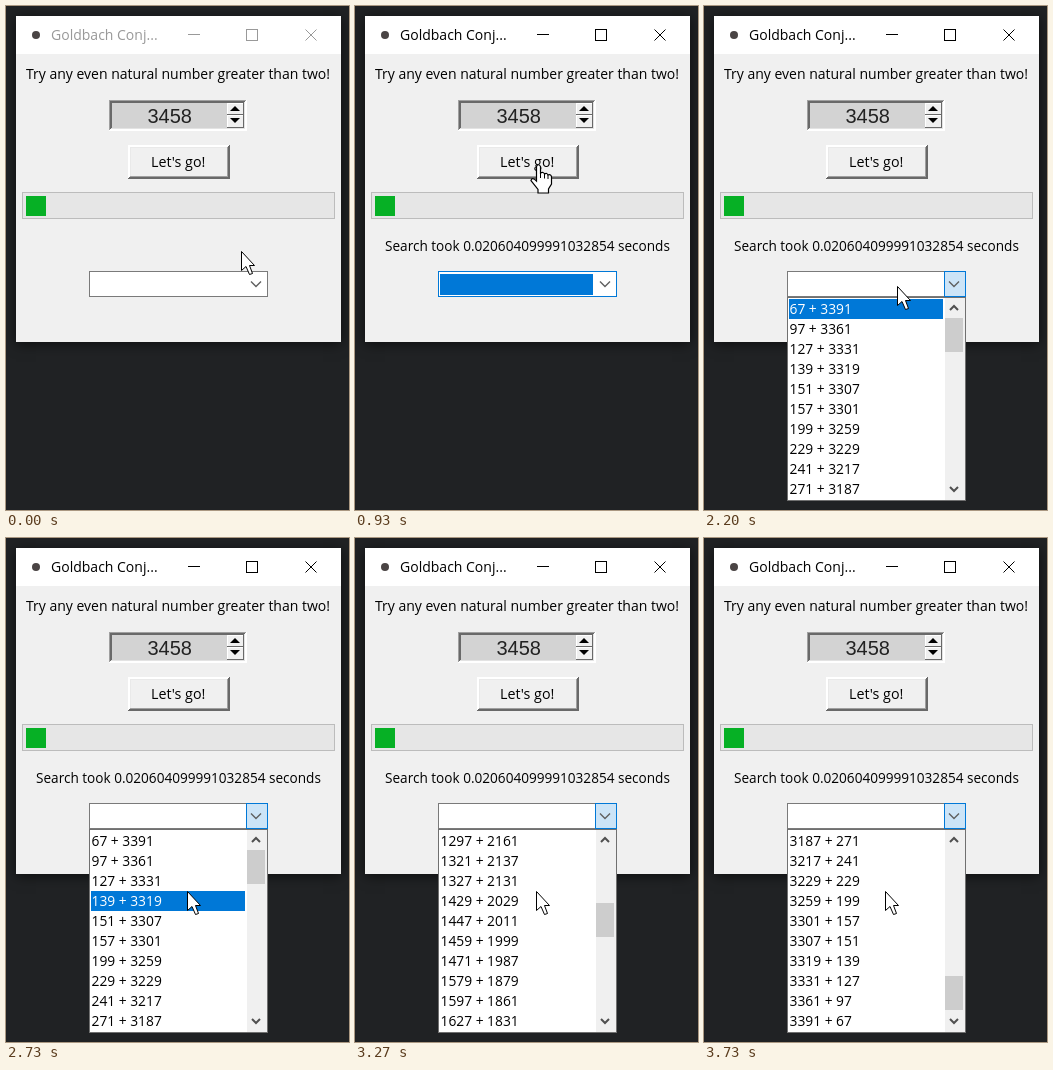
These frames come from a looping animation (343 by 504 pixels, 5000 ms). An HTML page with a canvas:

```html
<!DOCTYPE html>
<html lang="en">
<head>
<meta charset="utf-8">
<title>Goldbach Conjecture</title>
<style>
  html, body { margin: 0; width: 100%; height: 100%; overflow: hidden; background: #202224; }
  canvas { display: block; }
</style>
</head>
<body>
<canvas id="stage" width="343" height="504"></canvas>
<script>
const ctx = document.getElementById('stage').getContext('2d');
const LOOP = 5000, TICK = 1000 / 15;
const SUM = 3458, ROWS = 10, ROW_H = 20, LIST_TOP = 293, NOTCH = 4;
const BLUE = '#0078d7', FACE = '#f0f0f0', UI = '"Open Sans", "Noto Sans", sans-serif';

const isPrime = n => {
  if (n < 2) return false;
  for (let d = 2; d * d <= n; d++) if (n % d === 0) return false;
  return true;
};
const pairs = [];
for (let p = 2; p < SUM; p++) {
  if (isPrime(p) && isPrime(SUM - p)) pairs.push(`${p} + ${SUM - p}`);
}
const MAX_FIRST = pairs.length - ROWS;

function rect(x, y, w, h, fill) {
  ctx.fillStyle = fill;
  ctx.fillRect(x, y, w, h);
}

function frame(x, y, w, h, color, fill) {
  rect(x, y, w, h, color);
  rect(x + 1, y + 1, w - 2, h - 2, fill);
}

// Concentric one-pixel edges, each given as [top-left, bottom-right].
function bevel(x, y, w, h, edges, fill) {
  edges.forEach(([light, dark], i) => {
    const a = w - 2 * i, b = h - 2 * i;
    rect(x + i, y + i, a, b, dark);
    rect(x + i, y + i, a - 1, 1, light);
    rect(x + i, y + i, 1, b - 1, light);
  });
  const n = edges.length;
  rect(x + n, y + n, w - 2 * n, h - 2 * n, fill);
}

function text(str, x, y, size, color = '#000', family = UI) {
  ctx.font = `${size}px ${family}`;
  ctx.fillStyle = color;
  ctx.fillText(str, x, y);
}

function line(points, color, width = 1) {
  ctx.beginPath();
  points.forEach(([x, y]) => ctx.lineTo(x, y));
  ctx.strokeStyle = color;
  ctx.lineWidth = width;
  ctx.stroke();
}

function polygon(points, fill) {
  ctx.beginPath();
  points.forEach(([x, y]) => ctx.lineTo(x, y));
  ctx.closePath();
  ctx.fillStyle = fill;
  ctx.fill();
}

function chevron(x, y, r, dir, color, width) {
  line([[x - r, y - dir * r / 2], [x, y + dir * r / 2], [x + r, y - dir * r / 2]], color, width);
}

function drawWindow(active) {
  rect(0, 0, 343, 504, '#202224');
  ctx.save();
  ctx.shadowColor = 'rgba(0,0,0,0.6)';
  ctx.shadowBlur = 12;
  ctx.shadowOffsetY = 2;
  rect(10, 10, 325, 326, FACE);
  ctx.restore();
  rect(10, 10, 325, 38, '#fff');

  const ink = active ? '#000' : '#999';
  ctx.beginPath();
  ctx.arc(30, 29, 4, 0, 7);
  ctx.fillStyle = '#4a4444';
  ctx.fill();
  text('Goldbach Conj...', 45, 34, 14, ink);
  rect(182, 28, 12, 1, ink);
  ctx.strokeStyle = ink;
  ctx.lineWidth = 1;
  ctx.strokeRect(240.5, 23.5, 11, 11);
  line([[299.5, 23.5], [310.5, 34.5]], ink);
  line([[310.5, 23.5], [299.5, 34.5]], ink);
}

function drawSpinbox() {
  bevel(103, 94, 138, 31, [['#a0a0a0', '#fff'], ['#696969', '#fff'], ['#696969', '#e3e3e3']], '#d3d3d3');
  text('3458', 141.5, 117, 20, '#222', '"Liberation Sans", Arial, sans-serif');
  const raised = [['#fff', '#696969']];
  bevel(221, 97, 17, 12, raised, FACE);
  bevel(221, 109, 17, 13, raised, FACE);
  polygon([[224, 105], [234, 105], [229, 100]], '#000');
  polygon([[224, 112], [234, 112], [229, 117]], '#000');
}

const RELIEF = {
  raised: [['#fff', '#696969'], ['#fff', '#696969'], ['#e9e9e9', '#a0a0a0']],
  groove: [['#a0a0a0', '#fff'], ['#fff', '#a0a0a0'], ['#fff', '#a0a0a0']],
  sunken: [['#a0a0a0', '#fff'], ['#696969', '#fff'], ['#a0a0a0', '#e3e3e3']]
};

function drawControls(relief, done) {
  text('Try any even natural number greater than two!', 20, 73, 14);
  drawSpinbox();
  bevel(122, 139, 102, 34, RELIEF[relief], FACE);
  text("Let's go!", 145, 161, 14.3);
  frame(16, 186, 313, 27, '#bcbcbc', '#e6e6e6');
  rect(20, 190, 20, 20, '#06b025');
  if (done) text('Search took 0.020604099991032854 seconds', 30, 245, 13.6);
}

function drawCombo(focused, open) {
  frame(83, 265, 179, 26, focused && !open ? BLUE : '#7a7a7a', '#fff');
  if (focused && !open) rect(85, 268, 153, 21, BLUE);
  if (open) frame(240, 265, 22, 26, BLUE, '#cce4f7');
  chevron(250, 278, 5, 1, '#606060', 1.4);
}

function drawList(first, selected) {
  frame(83, 291, 179, 204, '#707070', '#fff');
  for (let i = 0; i < ROWS; i++) {
    const y = LIST_TOP + i * ROW_H, on = first + i === selected;
    if (on) rect(85, y, 154, ROW_H, BLUE);
    text(pairs[first + i], 85.5, y + 15, 13.8, on ? '#fff' : '#000');
  }
  rect(241, 292, 20, 202, FACE);
  rect(241, Math.round(312 + 126 * first / MAX_FIRST), 18, 34, '#cdcdcd');
  chevron(250, 302, 4, -1, '#505050', 2);
  chevron(250, 483, 4, 1, '#505050', 2);
}

function drawArrow(x, y) {
  ctx.save();
  ctx.translate(x + 0.5, y + 0.5);
  const shape = [[0, 0], [0, 19], [4.5, 15], [8, 23], [11, 22], [8, 14], [13, 14], [0, 0]];
  polygon(shape, '#fff');
  line(shape, '#000');
  ctx.restore();
}

function drawHand(x, y) {
  ctx.save();
  ctx.translate(x, y);
  ctx.beginPath();
  ctx.moveTo(-1.5, 17);
  ctx.lineTo(-1.5, 2.5);
  ctx.quadraticCurveTo(0.5, -1, 2.5, 2.5);
  ctx.lineTo(2.5, 9);
  for (const [kx, ky] of [[6.5, 9], [10, 10], [13.5, 11.5]]) {
    ctx.quadraticCurveTo(kx - 1, ky - 1.5, kx, ky + 1);
  }
  ctx.lineTo(13.5, 20);
  ctx.lineTo(10.5, 25);
  ctx.lineTo(10.5, 29);
  ctx.lineTo(0, 29);
  ctx.lineTo(0, 25.5);
  ctx.lineTo(-7, 16.5);
  ctx.quadraticCurveTo(-6, 12.5, -1.5, 17);
  ctx.closePath();
  ctx.fillStyle = '#fff';
  ctx.fill();
  ctx.strokeStyle = '#000';
  ctx.lineWidth = 1.2;
  ctx.stroke();
  line([[2.5, 9], [2.5, 14]], '#000');
  line([[6.5, 10], [6.5, 14.5]], '#000');
  line([[10, 11], [10, 15]], '#000');
  ctx.restore();
}

const clamp = k => Math.min(1, Math.max(0, k));
const mix = (a, b, k) => a.map((v, i) => Math.round(v + (b[i] - v) * k));
const smooth = k => k * k * (3 - 2 * k);
const easeOut = (k, power) => 1 - (1 - k) ** power;
const START = [235, 245], BUTTON = [183, 158], LEAVE = [189, 243], COMBO = [193, 280], ITEM = [181, 353];

function pointer(n) {
  if (n < 25) return mix(START, BUTTON, smooth(clamp((n - 1) / 7)));
  if (n < 39) return mix(LEAVE, COMBO, easeOut(clamp((n - 25) / 4), 2));
  return mix(COMBO, ITEM, smooth(clamp((n - 38) / 3)));
}

// The wheel moves whole notches and slows towards the end of the list.
function firstRow(n) {
  const row = MAX_FIRST * easeOut(clamp((n - 46) / 10), 1.5);
  return Math.min(MAX_FIRST, Math.ceil(row / NOTCH) * NOTCH);
}

function draw(ms) {
  const n = Math.floor((ms % LOOP + 5) / TICK);
  const [x, y] = pointer(n);
  const onButton = n < 25 && y < 173;
  const relief = n >= 14 || !onButton ? 'raised' : n >= 12 ? 'sunken' : 'groove';
  const open = n >= 33;

  drawWindow(n >= 12);
  drawControls(relief, n >= 13);
  drawCombo(n >= 14, open);
  if (open) drawList(firstRow(n), Math.max(0, Math.floor((y - LIST_TOP) / ROW_H)));
  (onButton ? drawHand : drawArrow)(x, y);
}

const begin = performance.now();
function loop() {
  draw(performance.now() - begin);
  requestAnimationFrame(loop);
}
loop();
</script>
</body>
</html>
```
